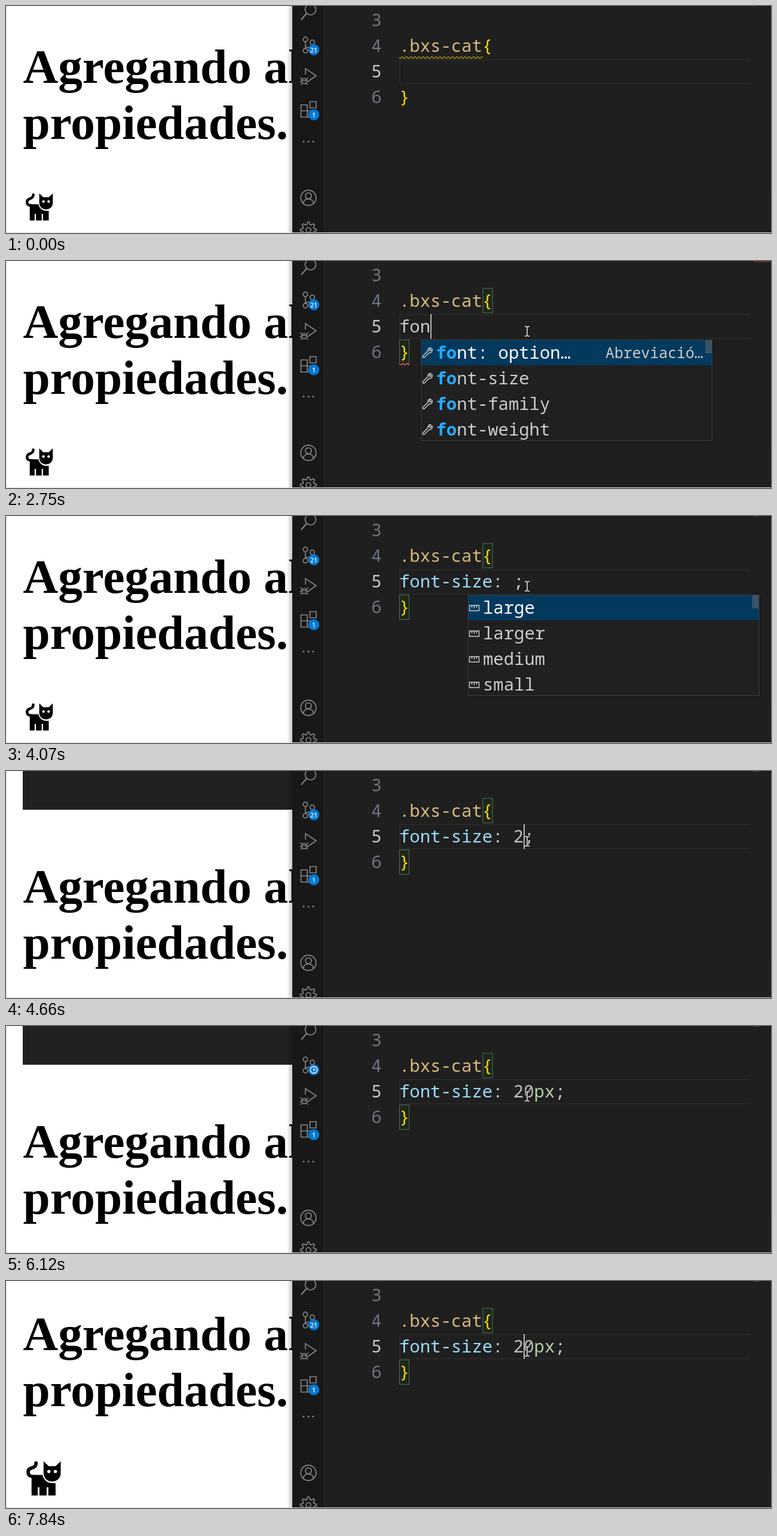
Write an HTML page with a canvas that moves like this. It is 1280 px wide and 381 px high and loops after 8 s.

```html
<!DOCTYPE html>
<html lang="es">
<head>
<meta charset="utf-8">
<title>Editor CSS con vista previa</title>
<style>
html, body { margin: 0; width: 100%; height: 100%; overflow: hidden; background: #fff; }
canvas { display: block; }
</style>
</head>
<body>
<canvas id="stage" width="1280" height="381"></canvas>
<script>
const ctx = document.getElementById('stage').getContext('2d');
const LOOP = 8000;
const CHAR = 17.35, CODE_X = 658, ROW = 43;
const MONO = '"Noto Sans Mono", monospace';
const SANS = '"Open Sans", sans-serif';
const SERIF = '"Liberation Serif", serif';
const GREY = '#868686', TEXT = '#cccccc', BLUE = '#0078d4', GOLD = '#ffd700';

// Timelines: [start in ms, value]; the last entry already started applies.
const TYPED = [[0, ''], [2620, 'f'], [2690, 'fo'], [2750, 'fon'], [2820, 'font'],
  [3410, 'font-size: ;'], [4530, 'font-size: 2;'], [4720, 'font-size: 20;'],
  [4920, 'font-size: 20p;'], [4980, 'font-size: 20px;']];
const CARET = [[0, 0], [2620, 1], [2690, 2], [2750, 3], [2820, 4], [3410, 11], [4530, 12],
  [4720, 13], [4920, 14], [4980, 15], [5180, 16], [7450, 15], [7580, 14], [7710, 13], [7840, 12]];
const CARET_ON = [[0, 0], [690, 1], [1150, 0], [1630, 1], [2160, 0], [2620, 1], [4070, 0],
  [4530, 1], [5660, 0], [6180, 1], [6650, 0], [7180, 1]];
const FONT_ROWS = ['font', 'font-size', 'font-family', 'font-weight'];
const ABBREVIATED = { x: 694, rows: ['font: option…', ...FONT_ROWS.slice(1)], match: 2, detail: 'Abreviació…', icon: 'wrench' };
const PROPERTIES = { x: 729, rows: FONT_ROWS, match: 4, icon: 'wrench' };
const VALUES = { x: 772.5, rows: ['large', 'larger', 'medium', 'small'], match: 0, icon: 'value' };
const UNITS = { x: 772.5, rows: ['20px', '20pc', '20pt', '20cap', '20rcap'], match: 3, icon: 'value' };
const POPUP = [[0, null], [2690, ABBREVIATED], [2890, PROPERTIES],
  [3350, { ...PROPERTIES, selected: 1 }], [3410, null], [3540, VALUES], [4530, null],
  [4920, UNITS], [4980, { ...UNITS, rows: ['20px'], match: 4 }], [5180, null]];
const PAGE = [[0, 'small'], [4660, 'reload'], [4720, 'small'], [6120, 'reload'], [6180, 'large']];

const at = (list, t) => list.reduce((value, [start, next]) => t >= start ? next : value, null);
const between = (t, a, b) => t >= a && t < b;

function rect(x, y, w, h, color) {
  ctx.fillStyle = color;
  ctx.fillRect(x, y, w, h);
}
function frame(x, y, w, h, color, width = 1) {
  ctx.strokeStyle = color;
  ctx.lineWidth = width;
  ctx.strokeRect(x, y, w, h);
}
function text(str, x, y, font, color, align = 'left') {
  ctx.font = font;
  ctx.fillStyle = color;
  ctx.textAlign = align;
  ctx.fillText(str, x, y);
}
const code = (str, col, y, color) => text(str, CODE_X + col * CHAR, y, `28.92px ${MONO}`, color);
function disc(x, y, r, color) {
  ctx.fillStyle = color;
  ctx.beginPath();
  ctx.arc(x, y, r, 0, 7);
  ctx.fill();
}
function ring(x, y, r, color = GREY, width = 1.7, from = 0, to = Math.PI * 2) {
  ctx.strokeStyle = color;
  ctx.lineWidth = width;
  ctx.beginPath();
  ctx.arc(x, y, r, from, to);
  ctx.stroke();
}
function line(path, color = GREY, width = 1.7) {
  ctx.strokeStyle = color;
  ctx.lineWidth = width;
  ctx.stroke(new Path2D(path));
}
function squiggle(x0, x1, y, color) {
  ctx.beginPath();
  for (let x = x0; x <= x1; x++) ctx.lineTo(x, y + 1.5 * Math.sin((x - x0) * Math.PI / 3.5));
  ctx.strokeStyle = color;
  ctx.lineWidth = 1.2;
  ctx.stroke();
}

const TAIL = new Path2D('M7.6 3C7.6 7 3 4.8 3 8.3C3 10.8 5 11 7 11');
const BODY = new Path2D('M5 10H11.4C12 13 14.4 14.8 17 14.8H19V22H14.8V17.2H13.8V22H9.6V17.2H8.6V22H5Z');
const HEAD = new Path2D('M12 2L15 4.8H19L22 2V8.6C22 11.8 20 13.8 17 13.8S12 11.8 12 8.6Z');

function drawCat(scale) {
  ctx.save();
  ctx.translate(28.4, 360 - 22 * scale);
  ctx.scale(scale, scale);
  ctx.strokeStyle = ctx.fillStyle = '#000';
  ctx.lineWidth = 2;
  ctx.lineCap = 'round';
  ctx.stroke(TAIL);
  ctx.fill(BODY);
  ctx.fill(HEAD);
  disc(15.1, 8, 0.95, '#fff');
  disc(18.9, 8, 0.95, '#fff');
  ctx.restore();
}

function drawPage(t) {
  const state = at(PAGE, t);
  const shift = { small: 0, reload: 92, large: -13 }[state];
  rect(0, 0, 1280, 381, '#fff');
  if (state === 'reload') rect(28, 0, 452, 65, '#212121');
  else drawCat(state === 'large' ? 2.87 : 2.27);
  const font = `bold 81.3px ${SERIF}`;
  text('Agregando algunas', 28.5, 129 + shift, font, '#000');
  text('propiedades.', 28.5, 222.5 + shift, font, '#000');
  rect(0, 0, 1, 381, '#dedede');
  rect(0, 380, 1280, 1, '#dedede');
  const shade = ctx.createLinearGradient(470, 0, 479, 0);
  shade.addColorStop(0, 'rgba(0,0,0,0)');
  shade.addColorStop(1, 'rgba(0,0,0,.22)');
  rect(470, 0, 9, 380, shade);
}

function badge(x, y, label) {
  disc(x, y, 9.3, BLUE);
  text(label, x, y + 4, `600 10.5px ${SANS}`, '#fff', 'center');
}

function drawGear(x, y) {
  ctx.beginPath();
  for (let i = 0; i < 32; i++) {
    const r = i % 4 < 2 ? 13.5 : 9.5, a = (i - 0.5) * Math.PI / 16;
    ctx.lineTo(x + r * Math.cos(a), y + r * Math.sin(a));
  }
  ctx.closePath();
  ctx.strokeStyle = GREY;
  ctx.lineWidth = 1.7;
  ctx.stroke();
  ring(x, y, 4);
}

function drawActivityBar(t) {
  rect(479, 0, 53, 380, '#181818');
  rect(532, 0, 1, 380, '#2a2a2a');
  ring(509.5, 6, 9);
  line('M503 12.5L494 23', GREY, 2);

  ring(501, 56, 3.8);
  ring(501, 75, 3.8);
  ring(512.5, 61, 3.8);
  line('M501 60V71M512.5 65C512 69 506 69 501 70');
  if (between(t, 5920, 6180)) {
    disc(515, 73.5, 9.3, BLUE);
    ring(515, 73.5, 5.8, '#fff', 1.4);
    line('M515 70V74H518', '#fff', 1.3);
  } else badge(515, 73.5, '21');

  line('M501 115V105L519 117L506 126');
  ring(499, 126, 4.4);
  line('M494.6 125H503.4M492 120L495.5 123M506 120L502.5 123M491.5 127H495M503 127H506.5M492.5 132L496 129.5M505.5 132L502 129.5', GREY, 1.4);

  line('M493.5 166H504V186.5H493.5ZM493.5 176H514.5V186.5H504M508.5 160.5H519V171H508.5Z');
  badge(515, 182.5, '1');

  for (const x of [498, 506, 514]) disc(x, 227.5, 1.5, GREY);
  ring(506, 322, 12.8);
  ring(506, 318.5, 5);
  line('M497.5 331C498.5 321.5 513.5 321.5 514.5 331');
  drawGear(506, 376);
}

function drawMatch(x, y) {
  rect(x, y, 16.5, 42, 'rgba(0,100,0,.12)');
  frame(x + 0.5, y + 0.5, 16, 41, '#55705a');
}

function drawEditor(t) {
  rect(533, 0, 747, 380, '#1f1f1f');
  rect(1279, 10, 1, 305, '#292929');
  [3, 4, 5, 6].forEach((n, i) =>
    text(n, 628.5, 34 + i * ROW, `28.92px ${MONO}`, n === 5 ? TEXT : '#6e7681', 'right'));
  frame(659, 90, 620, 40.5, '#282828', 2);
  rect(1245, 86, 34, 48, '#1f1f1f');

  if (t >= 750) {
    drawMatch(797.5, 45.5);
    drawMatch(658, 132);
  }
  code('.bxs-cat', 0, 77, '#d7ba7d');
  code('{', 8, 77, GOLD);
  code('}', 0, 163, GOLD);
  if (t < 2620) squiggle(658, 798, 86.5, '#b8960c');

  if (between(t, 2690, 3540)) {
    squiggle(659, 675, 173, '#f14c4c');
    rect(1251, 0, 28, 2, '#6b2424');
  } else rect(1250, 0, t >= 3410 ? 12 : 3, 1, '#3f4648');

  const typed = at(TYPED, t);
  if (typed.length < 11) code(typed, 0, 120, typed === 'font' ? '#9cdcfe' : TEXT);
  else {
    const digits = typed.match(/\d*/g).join('');
    const unit = typed.match(/(p?x?);$/)[1];
    code('font-size', 0, 120, '#9cdcfe');
    code(':', 9, 120, TEXT);
    code(digits, 11, 120, '#bcc2b4');
    code(unit, 11 + digits.length, 120, '#b5cea8');
    code(';', typed.length - 1, 120, TEXT);
  }
  if (at(CARET_ON, t)) rect(Math.round(CODE_X + at(CARET, t) * CHAR), 89, 2, 42, '#b4b5b3');
}

function drawItemIcon(kind, x, y) {
  ctx.save();
  ctx.translate(x, y);
  if (kind === 'wrench')
    line('M-7 5L1 -3C0 -6 3 -9 6 -8L3 -5L5 -3L8 -6C9 -2 6 1 3 0L-5 8C-7 9 -9 7 -7 5Z', TEXT, 1.5);
  else line('M-8 -4H8V5H-8ZM-4 -4V0M0 -4V1M4 -4V0', TEXT, 1.4);
  ctx.restore();
}

function drawPopup(t) {
  const popup = at(POPUP, t);
  if (!popup) return;
  const { x, rows, match, detail, icon, selected = 0 } = popup;
  const height = rows.length * ROW - 3;
  ctx.save();
  ctx.shadowColor = 'rgba(0,0,0,.35)';
  ctx.shadowBlur = 6;
  rect(x, 132, 488, height, '#202020');
  ctx.restore();
  rect(x, 132 + selected * ROW, 488, ROW, '#04395e');
  rows.forEach((label, i) => {
    const y = 164 + i * ROW, color = i === selected ? '#fff' : TEXT;
    drawItemIcon(icon, x + 11, y - 10);
    text(label.slice(0, match), x + 25.5, y, `bold 28.92px ${MONO}`, '#2aaaff');
    text(label.slice(match), x + 25.5 + match * CHAR, y, `28.92px ${MONO}`, color);
  });
  if (detail) text(detail, x + 309, 163, `24.8px ${MONO}`, TEXT);
  if (rows.length > 1) rect(x + 476, 133, 11, 22, 'rgba(121,121,121,.45)');
  frame(x + 0.5, 132.5, 487, height, '#3f3f3f');
}

function drawPointer(t) {
  if (t < 130) return;
  const step = Math.min(7, Math.floor((t - 130) / 69));
  const ease = 0.5 - Math.cos(Math.PI * step / 7) / 2;
  const x = 493 + 379 * ease, y = 352 - 234 * ease;
  ctx.save();
  ctx.translate(x, y);
  if (x < 533) {
    const arrow = new Path2D('M0 0V17L4 13L7 20L10 19L7 12H12Z');
    ctx.fillStyle = '#fff';
    ctx.fill(arrow);
    ctx.strokeStyle = '#000';
    ctx.lineWidth = 1;
    ctx.stroke(arrow);
  } else {
    const beam = 'M-4 -8H-1.5L0 -7L1.5 -8H4M0 -7V7M-4 8H-1.5L0 7L1.5 8H4';
    line(beam, '#1a1a1a', 3.4);
    line(beam, '#f0f0f0', 1.5);
  }
  ctx.restore();
}

function draw(now) {
  const t = now % LOOP;
  drawPage(t);
  drawEditor(t);
  drawActivityBar(t);
  drawPopup(t);
  drawPointer(t);
  requestAnimationFrame(draw);
}
requestAnimationFrame(draw);
</script>
</body>
</html>
```
